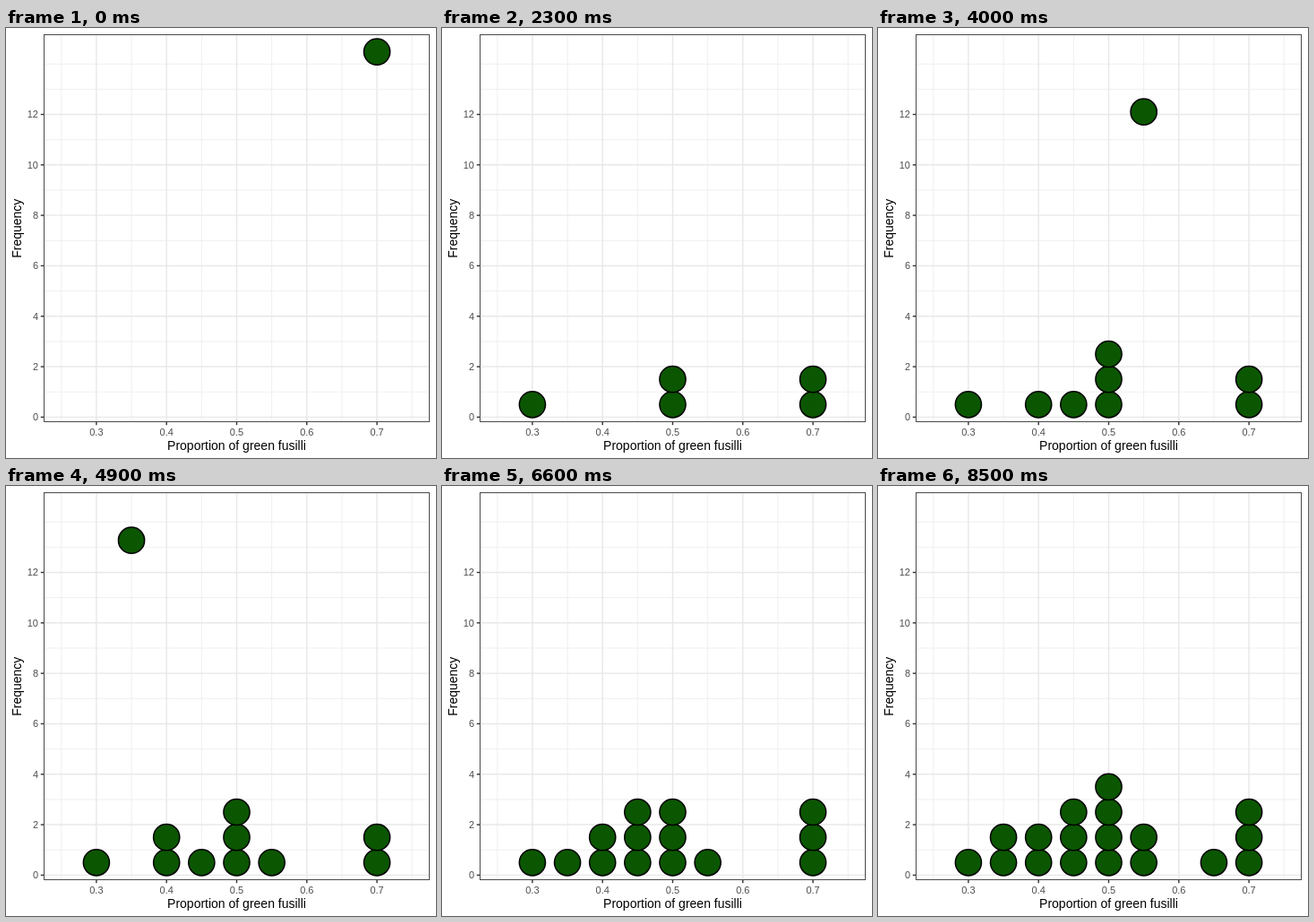
Write an HTML page that moves like this. It is 480 px wide and 480 px high and loops after 10000 ms.

```html
<!DOCTYPE html>
<html lang="en">
<head>
<meta charset="utf-8">
<title>Dot plot building up</title>
<style>
  html, body { margin: 0; width: 100%; height: 100%; overflow: hidden; background: #fff; }
  svg { display: block; width: 480px; height: 480px; }
  text { font-family: "Liberation Sans", Arial, sans-serif; }
  .tick { font-size: 11px; fill: #4d4d4d; }
  .title { font-size: 14px; fill: #000; text-anchor: middle; }
  .major { stroke: #e8e8e8; stroke-width: 1.42; }
  .minor { stroke: #ebebeb; stroke-width: .8; }
  .mark { stroke: #333; stroke-width: 1.42; }
  .frame { fill: none; stroke: #4a4a4a; stroke-width: 1; }
  .ball { fill: #0b5600; stroke: #000; stroke-width: 1.5; }
</style>
</head>
<body>
<svg id="plot" viewBox="0 0 480 480"></svg>
<script>
const plot = document.getElementById('plot');
const LEFT = 42.5, RIGHT = 472.5, TOP = 7.5, BOTTOM = 439.5;
const px = v => 257.5 + (v - 0.5) * 783;
const py = v => 434.4 - v * 28.16;

function add(tag, attrs, text) {
  const el = document.createElementNS('http://www.w3.org/2000/svg', tag);
  for (const key in attrs) el.setAttribute(key, attrs[key]);
  if (text) el.textContent = text;
  plot.appendChild(el);
  return el;
}
const line = (cls, x1, y1, x2, y2) => add('line', { class: cls, x1, y1, x2, y2 });
const vLine = (cls, v) => line(cls, px(v), TOP, px(v), BOTTOM);
const hLine = (cls, v) => line(cls, LEFT, py(v), RIGHT, py(v));

// Grid
for (let i = 0; i < 6; i++) vLine('minor', 0.25 + i / 10);
for (let v = 1; v <= 13; v += 2) hLine('minor', v);
hLine('minor', 14);
for (let i = 3; i <= 7; i++) vLine('major', i / 10);
for (let v = 0; v <= 12; v += 2) hLine('major', v);

// Axes
for (let i = 3; i <= 7; i++) {
  const x = px(i / 10);
  line('mark', x, BOTTOM, x, BOTTOM + 3.7);
  add('text', { class: 'tick', x, y: 455, 'text-anchor': 'middle' }, '0.' + i);
}
for (let v = 0; v <= 12; v += 2) {
  line('mark', LEFT - 3.7, py(v), LEFT, py(v));
  add('text', { class: 'tick', x: 36, y: py(v) + 4, 'text-anchor': 'end' }, String(v));
}
add('text', { class: 'title', x: 257.5, y: 471 }, 'Proportion of green fusilli');
add('text', { class: 'title', transform: 'translate(17 223.7) rotate(-90)' }, 'Frequency');

// Balls in the order they drop; each lands on its column's stack
const drops = [.7, .7, .5, .5, .3, .4, .5, .45, .55, .4, .35, .45, .45, .7, .55, .5, .35, .65];
const height = {};
const balls = drops.map(v => {
  const level = height[v] = (height[v] || 0) + 1;
  const el = add('circle', { class: 'ball', cx: px(v), r: 14.6 });
  return { el, rest: level - 0.5 };
});
add('rect', { class: 'frame', x: LEFT, y: TOP, width: RIGHT - LEFT, height: BOTTOM - TOP });

const LOOP = 10000, TICK = 100, LAST = 85;
const STEPS = 10, START = 14.5;
const END = drops.length * STEPS - 1;

function draw(ms) {
  const tick = Math.min(LAST, Math.floor(ms / TICK));
  const pos = Math.min(END, Math.floor((tick + 0.5) * END / LAST));
  balls.forEach(({ el, rest }, i) => {
    const step = pos - i * STEPS;
    const t = Math.min(1, step / (STEPS - 1));
    el.setAttribute('visibility', step > 0 ? 'visible' : 'hidden');
    el.setAttribute('cy', py(START - (START - rest) * t ** 3));
  });
}

const begin = performance.now();
function loop() {
  draw((performance.now() - begin) % LOOP);
  requestAnimationFrame(loop);
}
loop();
</script>
</body>
</html>
```
